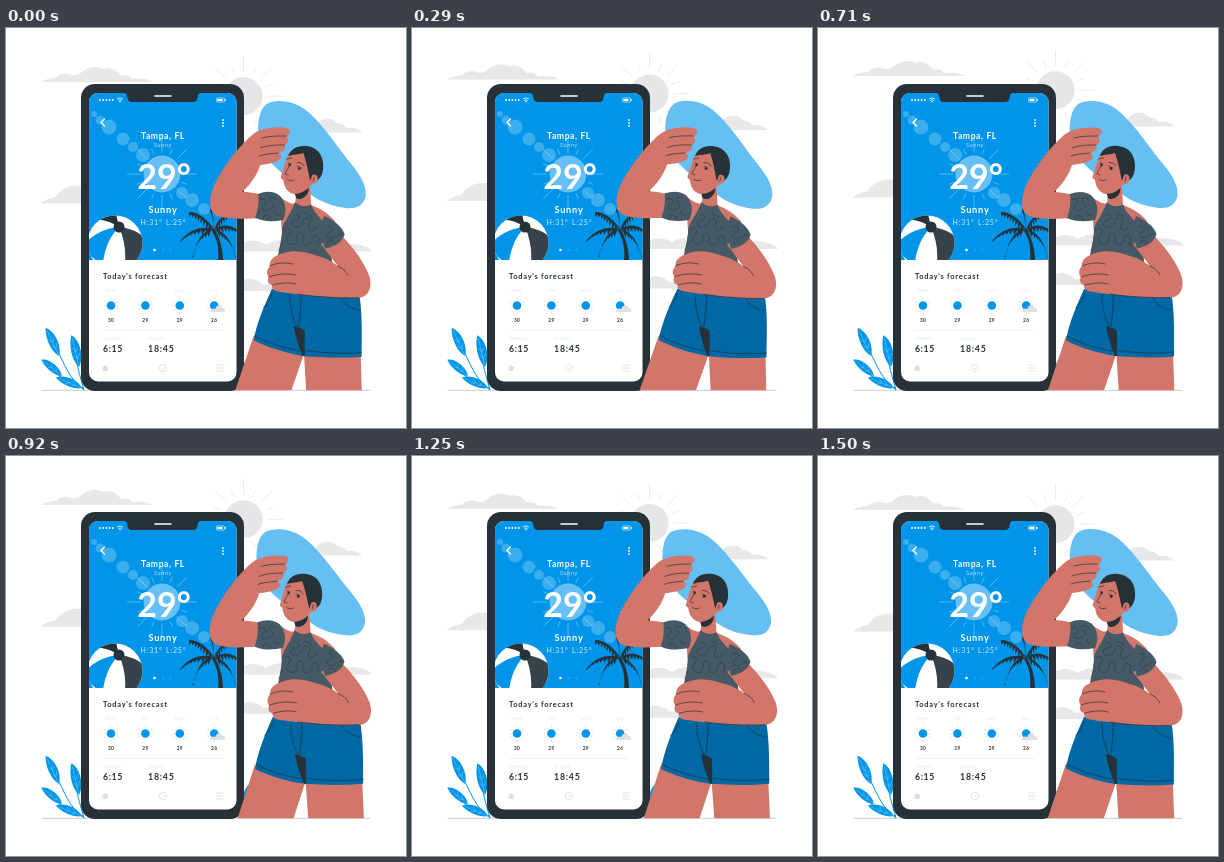
An HTML page for the animation above (1540 ms loop, 400 by 400 pixels).

```html
<!DOCTYPE html>
<html lang="en">
<head>
<meta charset="utf-8">
<title>Weather app</title>
<style>
  html, body { margin: 0; height: 100%; overflow: hidden; background: #fff; }
  svg { display: block; width: 100%; height: 100%; }
  text { font-family: Lato, "Open Sans", sans-serif; font-weight: 700; }
  .line { fill: none; stroke: #263238; stroke-width: .7; stroke-linecap: round; stroke-linejoin: round; }
  .skin { fill: #d3766a; }
  .ink { fill: #263238; }
  .blue { fill: #0095e9; }
  .cloth { fill: #455a64; }
  .mid { text-anchor: middle; }
  .light { font-weight: 400; }
  .faint { fill: #e3e3e3; font-weight: 400; font-size: 4px; letter-spacing: .3px; }
</style>
</head>
<body>
<svg viewBox="0 0 400 400">
  <defs>
    <clipPath id="screen"><rect x="83" y="65" width="147.500" height="288.500" rx="9"/></clipPath>
    <clipPath id="sky"><path d="M83 65H231V232H83Z"/></clipPath>
    <clipPath id="ball"><circle cx="109" cy="215" r="27.500"/></clipPath>
    <clipPath id="ground"><path d="M0 0H400V362.300H0Z"/></clipPath>
    <path id="leaf" class="blue" d="M0 0C-6-8-6-21-2-31C5-26 7-9 0 0Z"/>
    <path id="vein" d="M0 0L-1.500-28M0-8l-3-4M0-8l3-5M-.5-15l-3-4M-.5-15l3-4" fill="none" stroke="#7ecbf6" stroke-width=".5"/>
  </defs>

  <g id="weather">
    <g stroke="#e8e8e8" stroke-width=".8" id="sunRays"></g>
    <circle cx="237.500" cy="65.200" r="19" fill="#e6e6e6"/>
    <g fill="#e8e8e8">
      <path d="M35 51C40 48 45 47 50 47C54 42 61 42 66 44C70 45 73 43 76 41C82 35 92 35 98 38C105 35 112 40 115 45C119 43 124 45 126 48C134 47 142 48 147 51Z"/>
      <path d="M35 172.500C40 168 46 167 50 166C55 157 67 152 80 156V172.500Z"/>
      <path d="M300 101.500C303 97 308 98 310 94C314 86 326 86 331 92C336 92 339 95 341 97C347 96 353 98 356 101.500Z"/>
      <path d="M236 220.500V213C245 207 256 211 260 214C270 207 284 208 289 215C310 211 330 213 342 213C350 213 361 214 366 220.500Z"/>
      <path d="M236 260V250C245 245 254 250 257 254C280 252 300 257 302 260Z"/>
    </g>
  </g>

  <path class="line" d="M36 362.300H364" stroke-opacity=".6" style="stroke-width:.4"/>

  <g id="plant">
    <path d="M78 362C63 352 58 334 49 318M78 362C74 348 72 342 70 330M78 360C65 358 54 349 44 340" fill="none" stroke="#0095e9" stroke-width="1"/>
  </g>
  <path class="blue" d="M236 352C235 340 239 329 247 326C252 333 246 345 236 352Z"/>

  <rect class="ink" x="75" y="56" width="163" height="307" rx="14"/>
  <g clip-path="url(#screen)">
    <path fill="#fff" d="M83 65H231V355H83Z"/>
    <path class="blue" d="M83 65H231V232H83Z"/>
    <g clip-path="url(#sky)">
      <g id="flare" fill="#fff" fill-opacity=".23"></g>
      <circle cx="156" cy="146" r="18.500" fill="#67c0f5"/>
      <g id="glow" stroke="#8fd0f7" stroke-width=".6"></g>
      <g clip-path="url(#ball)">
        <path fill="#fff" d="M80 185H140V234H80Z"/>
        <path class="ink" d="M113 199C105 194 97 191 88 192L92 185L110 186Z"/>
        <path class="blue" d="M113 199C100 200 90 205 80 214V224L92 234H97C99 220 104 208 113 199Z"/>
        <path fill="#37424a" d="M113 199C118 210 120 222 119 234H140V212C134 204 124 200 113 199Z"/>
        <circle class="ink" cx="113" cy="199" r="5.500"/>
      </g>
      <g id="palm" class="ink"><path d="M208 200C214 210 217 221 217 233H212C213 222 212 212 206 203Z"/></g>
    </g>
    <path class="ink" d="M116 64C121 65 121 67 121.500 70Q122 74 126 74H187Q191 74 191.500 70C192 67 192 65 197 64Z"/>
  </g>
  <path d="M149 68H165" stroke="#fff" stroke-width="1.600" stroke-linecap="round"/>

  <g fill="#fff">
    <path d="M94 72h13" stroke="#fff" stroke-width="1.900" stroke-linecap="round" stroke-dasharray="0 3.200"/>
    <path d="M111 71Q114 68.800 117 71M112.300 72.500Q114 71.200 115.700 72.500" fill="none" stroke="#fff" stroke-width=".8"/>
    <circle cx="114" cy="73.800" r=".7"/>
    <rect x="210.500" y="70" width="8" height="4" rx="1" fill="none" stroke="#fff" stroke-width=".6"/>
    <path d="M211.500 71h5v2h-5zM219 71.200h1v1.600h-1z"/>
    <path d="M98.500 91L95 94.500L98.500 98" fill="none" stroke="#fff" stroke-width="1.300" stroke-linecap="round"/>
    <circle cx="217" cy="92" r=".9"/><circle cx="217" cy="95" r=".9"/><circle cx="217" cy="98" r=".9"/>
    <text class="mid" x="157" y="110.500" font-size="8.600" letter-spacing=".6">Tampa, FL</text>
    <text class="mid light" x="157" y="119" font-size="5.500" letter-spacing=".6" opacity=".75">Sunny</text>
    <text class="mid" x="158" y="161" font-size="34">29°</text>
    <text class="mid" x="157" y="184.500" font-size="9.200" letter-spacing=".8">Sunny</text>
    <g font-size="7" letter-spacing=".8" opacity=".85">
      <text class="light" x="134.500" y="197">H:31°</text>
      <text class="light" x="160" y="197">L:25°</text>
    </g>
    <circle cx="148.500" cy="222" r="1.300"/>
    <circle cx="157" cy="222" r=".8" opacity=".3"/><circle cx="164.500" cy="222" r=".8" opacity=".3"/>
  </g>

  <g class="ink">
    <text x="97" y="251" font-size="7.400" letter-spacing=".75">Today's forecast</text>
    <g id="days"></g>
    <path d="M97 302.500H217" stroke="#e8e8e8" stroke-width=".6"/>
    <text class="faint" x="97" y="312">SUNRISE</text>
    <text class="faint" x="142" y="312">SUNSET</text>
    <text x="97" y="324.300" font-size="8.800" letter-spacing=".6">6:15</text>
    <text x="142" y="324.300" font-size="8.800" letter-spacing=".8">18:45</text>
  </g>
  <g fill="none" stroke="#dedede" stroke-width=".8">
    <path fill="#dedede" d="M96.500 340L99.200 337.300L102 340H101.200V342.500H97.200V340Z"/>
    <circle cx="157" cy="340" r="3.700"/><path d="M155.500 340L156.700 341.300L159 338.700M210 337H217.500M210 340H217.500M210 343H217.500"/>
  </g>

  <g clip-path="url(#ground)"><g id="woman">
    <path fill="#66bff2" d="M253 116C250 98 252 80 262 75C272 71 287 73 298 81C313 92 327 113 341 131C352 144 361 156 359.500 168C356 182 344 181 332 178.500C315 175 306 168 296 160C279 148 258 133 253 116Z"/>

    <path class="skin" d="M248 308L228 368H284L299 324ZM298 320L301 368H356.500L355 324Z"/>
    <path class="skin" d="M273 168C279 173 286 177 289 175L291 160H304L305 177C313 180 321 184 329 193L322 270H266L276 205Z"/>
    <path fill="#0069a5" d="M266 261C258 279 251 295 248 312.500C263 320 280 325 297 328C317 329.500 337 330 356 328.500C356 307 357 285 353 263Z"/>
    <path class="ink" d="M288 298C290 309 293 319 297 328L299 328L299 303C296 300 292 299 288 298Z"/>
    <path class="line" d="M284 267C284 277 286 290 291 298M295 266C296 275 294 290 293 298M333 266C336 275 343 280 353 282M266 266C264 273 261 277 258 279M249 308C262 315 278 320 294 323M300 322.500C318 325 338 326 356 324" stroke-width=".6"/>

    <path class="cloth" d="M289 174C294 179 300 179 305 176.500C308 185 315 191 320 196L327 239H269C272 226 276 215 276 200C279 192 285 185 289 174Z"/>
    <path class="skin" d="M334 206C344 215 359 234 363.500 248C367 260 362 269 353 269.500C330 271 295 267 272 263.500C267 262.500 266 260 266 257C262 256 261 252 263 249C260 246 261 241 264 238C263 231 270 227 278 225C291 221 302 225 312 228C320 230 327 234 332 238L315 216Z"/>
    <path class="line" d="M264 238C271 235 279 234 287 236M263 249C271 246 281 245 290 247M267 257C275 255 282 254 290 256M332 238C337 240 340 243 342 247M292 266C310 269 335 270 352 269.500"/>
    <path class="cloth" d="M318 188C326 191 336 198 338.500 206C337 213 330 218 319 220.500C316 211 314 198 318 188Z"/>

    <path class="skin" d="M256 167C248 165 240 164 236 164C244 157 251 147 254 137C262 136 268 135 273 132C276 130 275 126 272 125C277 124 280 121 278 117C282 116 283 112 280 108C285 107 285 101 280 100C268 98 253 101 246 107C232 119 214 143 207 160C202 173 203 184 211 188C222 192 240 191 255 190Z"/>
    <path class="line" d="M280 108C271 108 263 108 256 110M278 117C270 117 262 117 254 120M272 125C264 126 258 126 253 128"/>
    <path class="cloth" d="M252 166C260 163 268 163 274 168C280 175 281 184 277 192C267 194 257 194 249 190C252 182 253 174 252 166Z"/>
    <path class="line" stroke-opacity=".65" d="M254 172c6-3 8 3 4 5s-2 7 4 5s7-5 3-8s0-6 5-3M257 190c1-5 7-3 8 2M270 183c-4 3 1 6 5 3M288 187c6-2 7 5 2 5s-7 6-2 7s8-2 9-6s6-4 7 0s-3 5-1 8s7 0 8-3M279 201c5-3 7 3 4 6s-4 7 1 9s8-3 7-7s4-5 6-2s-2 7 1 9s9-1 8-5s4-5 6-2s-2 6 1 8M299 185c3 3 8 1 6 5M277 214c-4 3-2 7-5 9M321 198c6-2 7 5 3 6s-4 6 1 6s7-6 11-3M322 215c1-4 6-3 7 1"/>

    <path class="ink" d="M288 164L303 157L302 164C299 171 293 172 290 170Z"/>
    <path class="skin" d="M282 126C279 134 277 141 274.500 149C275 151 276 151 277 152C278 160 282 165 288 166C296 166 302 161 306 156C311 156 314 151 312 146L304 124L292 120Z"/>
    <path class="ink" d="M282 128C284 121 291 117 300 118C311 119 317 127 317 138C317 146 314 151 311 152C313 148 309 145 306 147L304 153C302 144 300 133 297 125C292 127 287 126 282 128Z"/>
    <path class="line" d="M280.500 131L285.500 130M291 134.500Q296 134 298 138M283 138C281 142 279 144 279 146L282 147M281 151Q283.500 154 288 152M282 135L284.500 136M291 138L295 140M308 149L307 153"/>
    <circle class="ink" cx="283.500" cy="137" r="1.300"/><circle class="ink" cx="293" cy="140.500" r="1.400"/>
  </g></g>
</svg>
<script>
const LOOP = 1540, LEAD = .25;
const $ = id => document.getElementById(id);
const add = (id, markup) => $(id).insertAdjacentHTML("beforeend", markup);

function rays(x, y, count, inner, long, short) {
  let d = "";
  for (let i = 0; i < count; i++) {
    const a = i / count * 2 * Math.PI - Math.PI / 2, outer = i % 2 ? short : long;
    const c = Math.cos(a), s = Math.sin(a);
    d += `M${x + c * inner} ${y + s * inner}L${x + c * outer} ${y + s * outer}`;
  }
  return `<path d="${d}"/>`;
}

// A palm frond: smooth upper edge, serrated lower edge
function frond(tipX, tipY, bendX, bendY) {
  const x0 = 208, y0 = 201, teeth = 8;
  let d = `M${x0} ${y0}Q${bendX} ${bendY} ${tipX} ${tipY}`;
  for (let i = teeth; i > 0; i--) {
    const t = i / (teeth + 1), u = 1 - t;
    const x = u * u * x0 + 2 * u * t * bendX + t * t * tipX;
    const y = u * u * y0 + 2 * u * t * bendY + t * t * tipY;
    d += `L${x + (tipX - x0) * .1} ${y + 8 * (1 - t * .5)}L${x} ${y + 2}`;
  }
  return `<path d="${d}Z"/>`;
}

add("sunRays", rays(237.5, 65.2, 16, 24, 40, 32));
add("glow", rays(156, 146, 16, 21, 35, 27));
add("flare", [[88, 86, 3], [94, 92, 4.5], [103, 99, 7.5], [117, 111, 6.5], [127, 119, 5],
  [137, 127, 7], [176, 165, 6], [186, 172, 7], [198, 181, 6]]
  .map(([x, y, r]) => `<circle cx="${x}" cy="${y}" r="${r}"/>`).join(""));
add("palm", [[174, 213, 188, 196], [183, 184, 196, 184], [204, 180, 208, 184], [230, 184, 216, 183],
  [237, 206, 222, 192], [187, 230, 192, 202], [230, 230, 224, 204]].map(f => frond(...f)).join(""));
add("plant", [[53, 328, -22, 1], [73, 339, -10, 1.05], [56, 348, -48, .85], [76, 360, -65, .9]]
  .map(([x, y, turn, size]) => `<g transform="translate(${x} ${y}) rotate(${turn}) scale(${size})">
    <use href="#leaf"/><use href="#vein"/></g>`).join(""));

["MON", "TUE", "WED", "THU"].forEach((day, i) => {
  const x = 105 + i * 34.4, cloudy = i === 3;
  add("days", `<text class="faint mid" x="${x}" y="263.500">${day}</text>
    <g stroke="#c3cdd2" stroke-width=".5">${rays(x, 277.5, 12, 5.8, 8.5, 7.2)}</g>
    <circle class="blue" cx="${x}" cy="277.500" r="4.300"/>
    ${cloudy ? `<path fill="#e0e0e0" d="M${x - 4} 284c0-4 4-4 5-3c1-5 7-4 7-1c3 0 3 2 3 4z"/>` : ""}
    <text class="mid" x="${x}" y="293.800" font-size="4.800" letter-spacing=".3">${[30, 29, 29, 26][i]}</text>`);
});

function draw() {
  const phase = performance.now() % LOOP / LOOP * 2 * Math.PI + LEAD;
  $("weather").setAttribute("transform", `translate(0 ${3 * Math.cos(phase)})`);
  $("woman").setAttribute("transform", `rotate(${.8 * Math.sin(phase)} 285 215)`);
  requestAnimationFrame(draw);
}
draw();
</script>
</body>
</html>
```
